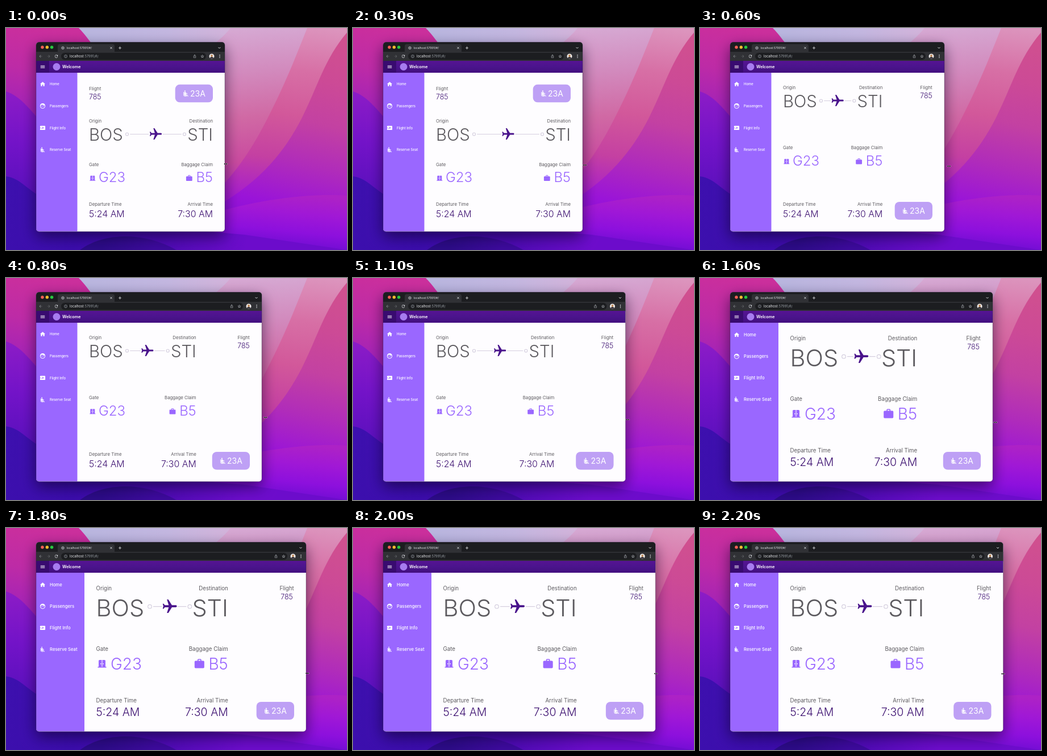
An HTML page with a canvas for the animation above (2300 ms loop, 600 by 392 pixels).

```html
<!DOCTYPE html>
<html lang="en">
<head>
<meta charset="utf-8">
<title>Responsive flight dashboard</title>
<style>
html, body { margin: 0; width: 100%; height: 100%; overflow: hidden; background: #7a1fc4; }
canvas { display: block; width: 600px; height: 392px; }
</style>
</head>
<body>
<canvas id="stage"></canvas>
<script>
const stage = document.getElementById('stage');
const c = stage.getContext('2d');
const dpr = window.devicePixelRatio || 1;
stage.width = 600 * dpr;
stage.height = 392 * dpr;

const LEFT = 53, TOP = 25, BOTTOM = 359.5;
const DEEP = '#4a148c', INK = '#3c1070', VIOLET = '#9a67ff', GREY = '#5c5a5f';

// Icons on a 24 unit grid
const icons = {
  menu: 'M3 18h18v-2H3zm0-5h18v-2H3zm0-7v2h18V6z',
  home: 'M10 20v-6h4v6h5v-8h3L12 3 2 12h3v8z',
  face: 'M9 11.5a1.4 1.4 0 1 0 .01 0zM15 11.5a1.4 1.4 0 1 0 .01 0zM12 2C6.48 2 2 6.48 2 12s4.48 10 10 10 10-4.48 10-10S17.52 2 12 2zm0 18c-4.41 0-8-3.59-8-8 0-.29.02-.58.05-.86 2.36-1.05 4.23-2.98 5.21-5.37C11.07 8.33 14.05 10 17.42 10c.78 0 1.53-.09 2.25-.26.21.71.33 1.47.33 2.26 0 4.41-3.59 8-8 8z',
  ticket: 'M4 4h16q2 0 2 2v12q0 2-2 2H4q-2 0-2-2v-4a2 2 0 0 0 0-4V6q0-2 2-2zM18 12l-9.500 3.500-2.500-3 1.300-.3 1.500 1 3-1-3-4 1.500-.3 4 3.300 3-1z',
  seat: 'M7.59 5.41a2 2 0 1 1 2.83 0 2 2 0 0 1-2.83 0zM6 16V7H4v9c0 2.76 2.24 5 5 5h6v-2H9c-1.66 0-3-1.34-3-3zm14 4.07L14.93 15H11.500v-3.680c1.400 1.150 3.600 2.160 5.500 2.160v-2.160c-1.660.020-3.610-.870-4.670-2.040l-1.400-1.550c-.400-.450-1-.730-1.650-.730C8.010 7 7 8.010 7 9.250V15c0 1.660 1.340 3 3 3h5.070l3.500 3.500z',
  plane: 'M21 16v-2l-8-5V3.500c0-.83-.67-1.500-1.500-1.500S10 2.670 10 3.500V9l-8 5v2l8-2.500V19l-2 1.500V22l3.500-1 3.500 1v-1.500L13 19v-5.500z',
  door: 'M20 19V5q0-2-2-2h-5.300v16h-1.400V3H6q-2 0-2 2v14H2v2h20v-2zM10 13H8v-2h2zM16 13h-2v-2h2z',
  bag: 'M20 6h-4V4q0-2-2-2h-4q-2 0-2 2v2H4q-2 0-2 2v11q0 2 2 2h16q2 0 2-2V8q0-2-2-2zm-6 0h-4V4h4z',
  back: 'M20 11H7.830l5.590-5.590L12 4l-8 8 8 8 1.410-1.410L7.830 13H20z',
  reload: 'M17.650 6.350A8 8 0 1 0 19.730 14h-2.080A6 6 0 1 1 16.220 7.780L13 11h7V4z',
  share: 'M16 5l-1.420 1.420-1.590-1.590V16h-1.980V4.830L9.420 6.420 8 5l4-4zM20 10v11q0 2-2 2H6q-2 0-2-2V10q0-2 2-2h3v2H6v11h12V10h-3V8h3q2 0 2 2z',
  star: 'M22 9.240l-7.190-.62L12 2 9.190 8.630 2 9.240l5.460 4.730L5.820 21 12 17.270 18.180 21l-1.630-7.030zM12 15.400l-3.760 2.270 1-4.280-3.320-2.880 4.380-.38L12 6.100l1.710 4.040 4.380.38-3.320 2.880 1 4.280z'
};
for (const name in icons) icons[name] = new Path2D(icons[name]);

// Keys of the drag: window edge, pointer lead, pointer height
const times = [0, 300, 600, 1100, 1400, 1800, 2200];
const edges = [385, 404, 430, 479.5, 499.5, 528, 533.5];
const leads = [1.5, 4, 8, 3.5, 6.5, 2, -0.5];
const heights = [240, 242, 244, 250, 253, 256.5, 257.5];

// Cubic through the keys, with slopes taken from the neighbours
function curve(keys, t) {
  const last = times.length - 1;
  let i = 0;
  while (i < last - 1 && t >= times[i + 1]) i++;
  const slope = k => {
    const a = Math.max(k - 1, 0), b = Math.min(k + 1, last);
    return (keys[b] - keys[a]) / (times[b] - times[a]);
  };
  const span = times[i + 1] - times[i], u = (t - times[i]) / span, v = 1 - u;
  return keys[i] * v * v * (1 + 2 * u) + keys[i + 1] * u * u * (3 - 2 * u)
    + span * u * v * (slope(i) * v - slope(i + 1) * u);
}

function box(x, y, w, h, color, r = 0) {
  c.fillStyle = color;
  c.beginPath();
  c.roundRect(x, y, w, h, r);
  c.fill();
}
function dot(x, y, r, color) {
  c.fillStyle = color;
  c.beginPath();
  c.arc(x, y, r, 0, 7);
  c.fill();
}
function ring(x, y, r, color, width) {
  c.strokeStyle = color;
  c.lineWidth = width;
  c.beginPath();
  c.arc(x, y, r, 0, 7);
  c.stroke();
}
function stroke(path, color, width) {
  c.strokeStyle = color;
  c.lineWidth = width;
  c.stroke(new Path2D(path));
}
function text(str, x, y, size, color, align = 'left', weight = 400) {
  c.font = `${weight} ${size}px Inter, sans-serif`;
  c.textAlign = align;
  c.fillStyle = color;
  c.fillText(str, x, y);
}
function icon(name, x, y, size, color, turn = 0) {
  c.save();
  c.translate(x, y);
  c.rotate(turn);
  c.scale(size / 24, size / 24);
  c.translate(-12, -12);
  c.fillStyle = color;
  c.fill(icons[name], 'evenodd');
  c.restore();
}
function blend(x0, y0, x1, y1, ...colors) {
  const g = c.createLinearGradient(x0, y0, x1, y1);
  colors.forEach((color, i) => g.addColorStop(i / (colors.length - 1), color));
  return g;
}
function area(path, fill) {
  c.fillStyle = fill;
  c.fill(new Path2D(path));
}

function wallpaper() {
  // Pale sky turning to pink on the right
  box(0, 0, 600, 392, blend(150, 0, 420, 0, '#b9b6df', '#c3b7e0', '#d6b3d9'));
  area('M395 0C380 20 350 40 330 60V392H600V0Z',
    blend(420, 0, 450, 392, '#d6a9d3', '#d28abd', '#d069a4', '#c94a9f', '#a41fcb', '#8510dc'));
  area('M530 0C510 50 495 90 465 150S410 250 360 300V392H600V0Z',
    blend(550, 0, 500, 392, '#dc94bd', '#d76fa5', '#d2589a', '#c440a2', '#a41bcf', '#8a10dc'));
  area('M600 8C560 55 548 105 520 160S450 270 370 315V392H600Z',
    blend(580, 20, 500, 392, '#d0508f', '#cc4a96', '#c341a2', '#b02cba', '#9a14d8', '#7f0bd8'));
  area('M600 296C540 292 460 300 370 325V392H600Z',
    blend(500, 292, 490, 392, '#ad22c6', '#a018d6', '#8d10dd', '#6a0cd0'));

  // Magenta and violet folds on the left
  area('M0 0H128C138 10 145 20 160 40V392H0Z',
    blend(70, 0, 20, 300, '#cb2f9c', '#bd2ba6', '#a122b8', '#8519c6', '#6c12c2'));
  area('M0 112C25 120 45 145 80 190V392H0Z',
    blend(0, 112, 0, 290, '#8c1cc6', '#7313c8', '#5b10bd'));
  area('M0 262C28 265 40 292 85 310S230 350 420 365L600 392H0Z',
    blend(0, 270, 420, 392, '#3d10ae', '#3a0cab', '#4b0ab2', '#6c0ccb'));
  area('M130 392C170 362 240 358 300 392Z', blend(180, 360, 260, 392, '#2b0b86', '#3c0a9c'));
}

function browser(w) {
  const white = '#e8eaed', dim = '#9aa0a6';
  box(LEFT, TOP, w - LEFT, 34, '#1c1d20');
  box(91, 28.5, 100, 16, '#303135', 4);
  box(LEFT, 42, w - LEFT, 16, '#303135');
  ['#ff5f57', '#febc2e', '#28c840'].forEach((color, i) => dot(64 + i * 8.3, 34, 2.7, color));

  ring(100, 35.2, 2.3, '#bdc1c6', 0.8);
  stroke('M97.700 35.200h4.600M100 33v4.400', '#bdc1c6', 0.6);
  text('localhost:57991/#/', 106.5, 37.2, 5.1, white);
  stroke('M183.300 33.500l3.400 3.400m0-3.400l-3.400 3.400M198 35.200h5m-2.500-2.500v5', white, 0.8);
  stroke(`M${w - 11.5} 34l2 2 2-2`, white, 0.9);

  icon('back', 61, 50, 7.5, '#85888d');
  icon('back', 75, 50, 7.5, '#65686c', Math.PI);
  icon('reload', 88.5, 50, 8, white);
  box(97, 43.8, w - 33 - 97, 12.4, '#1c1d20', 6.2);
  ring(105, 50, 2.5, dim, 0.7);
  stroke('M105 49.600v1.900M105 48.300v.8', dim, 0.7);
  text('localhost', 112, 52.2, 5.8, white);
  text(':57991/#/', 112 + c.measureText('localhost').width, 52.2, 5.8, dim);
  icon('share', w - 53, 49.8, 6.5, '#bdc1c6');
  icon('star', w - 39.5, 50, 7.5, '#bdc1c6');

  c.save();
  c.beginPath();
  c.arc(w - 23, 50, 4.5, 0, 7);
  c.clip();
  box(w - 28, 45, 10, 10, '#eeeae8');
  dot(w - 23, 49, 1.9, '#b9834f');
  dot(w - 23, 54.2, 3.3, '#38343b');
  c.restore();
  [-2.3, 0, 2.3].forEach(dy => dot(w - 9, 50 + dy, 0.75, white));
}

function header(w) {
  box(LEFT, 58, w - LEFT, 21, blend(0, 58, 0, 79, '#561393', '#4a148c', '#430f80'));
  box(LEFT, 58, 23, 21, '#390b70');
  icon('menu', 64.5, 68.5, 10, '#fff');
  dot(89, 68.5, 6.5, '#a77cf0');
  text('Welcome', 99, 71.1, 7.2, '#fff', 'left', 600);
}

function sidebar(big) {
  box(LEFT, 79, big ? 85 : 72.5, BOTTOM - 79, VIOLET);
  [['home', 'Home'], ['face', 'Passengers'], ['ticket', 'Flight Info'], ['seat', 'Reserve Seat']]
    .forEach(([name, label], i) => {
      const y = big ? 100.3 + i * 38 : 99 + i * 38.7;
      icon(name, 64.5, y, 11, '#fff');
      text(label, 77, y + (big ? 2.8 : 2.2), big ? 7.7 : 5.9, '#fff', 'left', 450);
    });
}

function dashboard(w, wide, big) {
  const x = big ? 158.5 : 146, end = w - 21;
  const right = wide ? x + (end - x) * 2 / 3 : end;
  const label = big ? 9.7 : 7.8, city = big ? 41.5 : 29.3, gate = big ? 28 : 24;
  const rows = big ? [110, 156, 217, 250, 307.5, 332]
    : wide ? [108.3, 140, 214.3, 242.5, 314, 333.5]
    : [167, 199, 243.5, 272, 314, 333.5];

  function pair(row, a, b, size, color, weight) {
    text(a, x, rows[row], size, color, 'left', weight);
    text(b, right, rows[row], size, color, 'right', weight);
  }

  pair(0, 'Origin', 'Destination', label, GREY, 400);
  pair(1, 'BOS', 'STI', city, GREY, 350);
  pair(2, 'Gate', 'Baggage Claim', label, GREY, 400);
  text('G23', x + (big ? 25.5 : 17), rows[3], gate, VIOLET, 'left', 350);
  text('B5', right, rows[3], gate, VIOLET, 'right', 350);
  pair(4, 'Departure Time', 'Arrival Time', label, GREY, 400);
  pair(5, '5:24 AM', '7:30 AM', big ? 19.5 : 15.9, INK, 350);

  const iconY = rows[3] - (big ? 10.3 : 6.8), iconSize = big ? 19 : 13;
  icon('door', x + (big ? 10.5 : 6.3), iconY, iconSize - 1, VIOLET);
  icon('bag', right - (big ? 50.5 : 41.7), iconY, iconSize + (big ? 1.5 : 0), VIOLET);

  // Route between the two cities
  const a = x + (big ? 94.5 : 67), b = right - (big ? 67.5 : 50);
  const mid = (a + b) / 2, y = rows[1] - (big ? 17.3 : 11.5);
  const gap = big ? 14 : 12.5, rim = big ? 3.3 : 2.5, line = '#d5cfdf';
  ring(a, y, rim, line, 1.2);
  ring(b, y, rim, line, 1.2);
  stroke(`M${a + rim + 2.7} ${y}H${mid - gap}M${mid + gap} ${y}H${b - rim - 2.7}`, line, 1.2);
  icon('plane', mid, y, big ? 30 : 25.5, DEEP, Math.PI / 2);

  const center = end - (big ? 13 : 11);
  text('Flight', wide ? center : x, wide ? rows[0] : 110, big ? 9.7 : 8.2, GREY, wide ? 'center' : 'left');
  text('785', wide ? center : x, wide ? (big ? 126.3 : 123.5) : 126, 12.4, INK, wide ? 'center' : 'left', 350);

  const top = wide ? 307 : 99.8;
  box(end - 66.3, top, 66.3, 31.5, '#bea0f5', 8);
  icon('seat', end - 47.5, top + 16, 13, '#fff');
  text('23A', end - 40, top + 21.2, 14, '#fff');
}

function pointer(x, y) {
  const path = `M${x - 2.6} ${y}h5.200M${x - 1.6} ${y - 1}l-1 1 1 1M${x + 1.6} ${y - 1}l1 1-1 1`;
  stroke(path, 'rgba(255,255,255,.7)', 1.7);
  stroke(path, '#111', 1);
}

function draw(now) {
  const t = Math.floor(now % 2300 / 100) * 100;
  const w = curve(edges, t), wide = w > 415, big = w > 490;
  c.setTransform(dpr, 0, 0, dpr, 0, 0);
  wallpaper();

  c.save();
  c.shadowColor = 'rgba(10,0,35,.6)';
  c.shadowBlur = 26 * dpr;
  c.shadowOffsetY = 9 * dpr;
  box(LEFT, TOP, w - LEFT, BOTTOM - TOP, '#fefdff', 5);
  c.restore();

  c.save();
  c.beginPath();
  c.roundRect(LEFT, TOP, w - LEFT, BOTTOM - TOP, 5);
  c.clip();
  browser(w);
  header(w);
  sidebar(big);
  dashboard(w, wide, big);
  c.restore();

  c.strokeStyle = 'rgba(40,30,55,.55)';
  c.lineWidth = 0.6;
  c.beginPath();
  c.roundRect(LEFT, TOP, w - LEFT, BOTTOM - TOP, 5);
  c.stroke();
  pointer(w + curve(leads, t), curve(heights, t));
}

const start = performance.now();
(function tick() {
  draw(performance.now() - start);
  requestAnimationFrame(tick);
})();
</script>
</body>
</html>
```
